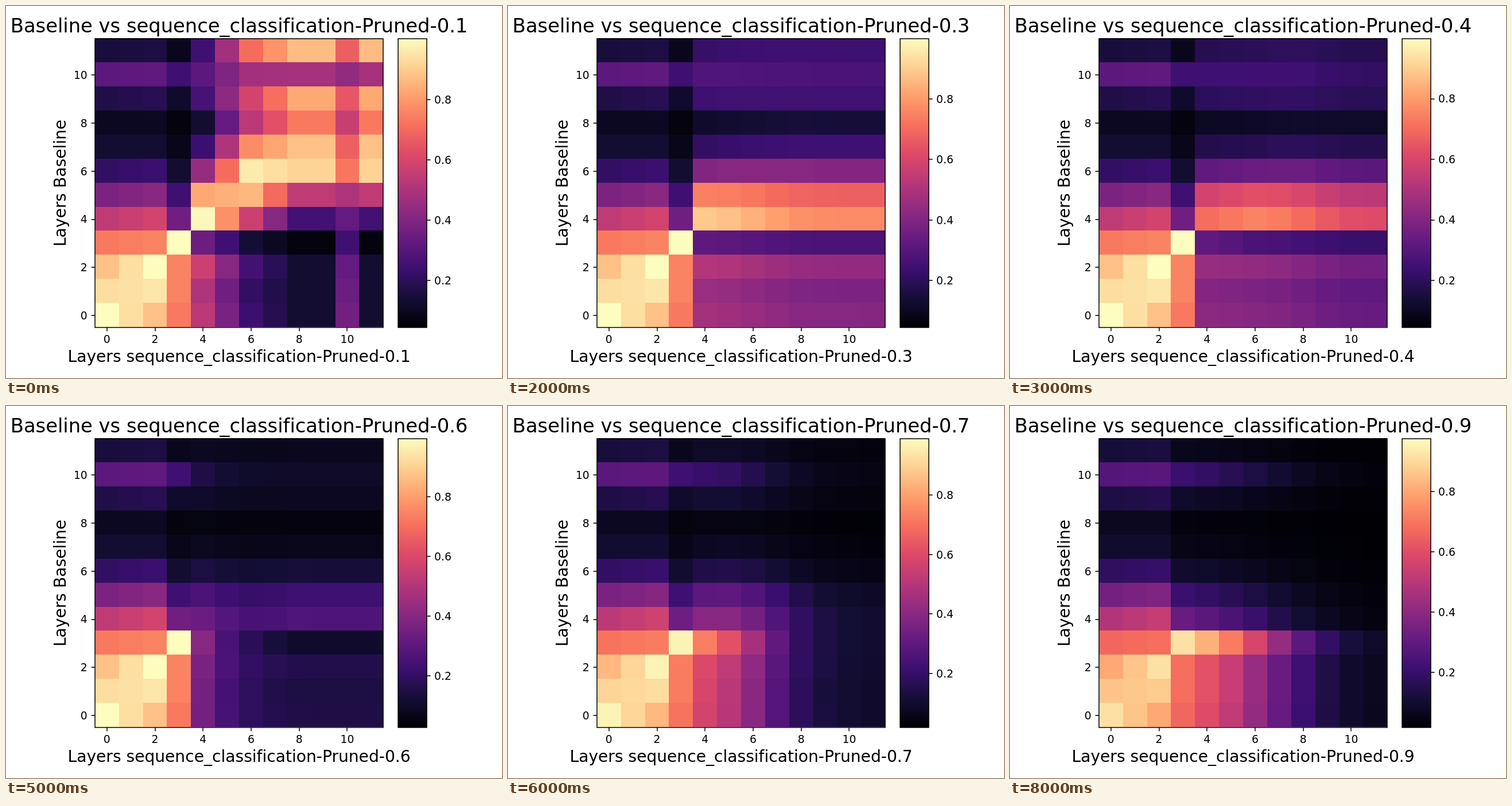
These frames come from a looping animation (864x648 px, 9000 ms). An HTML page:

```html
<!DOCTYPE html>
<html lang="en">
<head>
<meta charset="utf-8">
<title>Layer similarity</title>
<style>
html, body { margin: 0; width: 100%; height: 100%; overflow: hidden; background: #fff; }
svg { display: block; width: 864px; height: 648px; }
text { font-family: "DejaVu Sans", Verdana, sans-serif; font-size: 18.75px; font-variant-ligatures: none; }
.title { font-size: 33.75px; }
.label { font-size: 28.125px; }
.mid { text-anchor: middle; }
.end { text-anchor: end; }
.line { fill: none; stroke: #000; stroke-width: 1.5; }
.cell { shape-rendering: crispEdges; }
</style>
</head>
<body>
<svg id="stage" viewBox="0 0 864 648"></svg>
<script>
const LAYERS = 12, STEPS = 9, STEP_MS = 1000;
const LEFT = 154.85, TOP = 57, BOTTOM = 560, HEIGHT = BOTTOM - TOP, CELL = 41.87;
const GRID_BOTTOM = 558.9;
const BAR = 683, BAR_W = 50, TICK = 6.56, PAD = 13.1;

// Colour map in even steps from 0 to 100.
const MAGMA = [
  '#000004', '#140e36', '#3b0f70', '#641a80', '#8c2981', '#b73779',
  '#de4968', '#f7705c', '#fe9f6d', '#fecf92', '#fcfdbf'
].map(hex => [1, 3, 5].map(i => parseInt(hex.slice(i, i + 2), 16)));

const mix = (a, b, t) => a.map((v, i) => v + (b[i] - v) * t);

// Reads a list of values at x, blending between the nearest keys.
function blend(keys, x) {
  const known = Object.keys(keys).map(Number);
  const lo = Math.max(known[0], ...known.filter(k => k <= x));
  const hi = Math.min(known[known.length - 1], ...known.filter(k => k >= x));
  return hi > lo ? mix(keys[lo], keys[hi], (x - lo) / (hi - lo)) : keys[lo];
}

// Likeness of a few typical layers to each baseline layer, from 0 upwards.
const profiles = {
  0: [100, 93, 87, 72, 52, 36, 18, 9, 6, 13, 28, 11],
  2: [87, 95, 100, 74, 57, 39, 20, 9, 6, 15, 29, 12],
  3: [72, 74, 74, 100, 33, 21, 9, 4, 2, 8, 21, 5],
  4: [51, 48, 55, 32, 99, 82, 42, 20, 9, 23, 28, 21],
  6: [20, 18, 22, 10, 55, 85, 96, 76, 51, 57, 45, 69],
  8: [9, 9, 9, 2, 22, 52, 91, 87, 72, 82, 46, 86]
};

// Pruning makes upper layers resemble lower ones: they drift between the places
// [from, to] while their strength falls [near, far] around a column [mid, width].
const drift = { 1: [4, 8], 3: [4, 4.2], 5: [3.8, 4], 6: [3.4, 4], 8: [3, 3] };
const strength = {
  1: [1, 1, 6, 1], 3: [0.9, 0.8, 6.5, 0.8], 5: [0.6, 0.44, 10.5, 0.4],
  6: [0.81, 0.25, 4, 0.8], 8: [1, 0, 8.9, 1.2], 9: [1, 0.03, 6.4, 1.5]
};
const lowStrength = { 6: [1], 9: [0.94] };
const echo = { 1: [0.27], 3: [0] };  // layer 10 also resembles the first layers

// Heights of the 0.8 and 0.2 marks on the colour bar.
const scale = { 1: [163, 478], 5: [161, 478], 6: [158, 470], 8: [152, 462], 9: [149, 464] };

function column(step, col) {
  if (col < 4) return blend(profiles, col).map(v => v * blend(lowStrength, step)[0]);
  const [from, to] = blend(drift, step);
  const [near, far, mid, width] = blend(strength, step);
  const place = from + (to - from) * Math.min(1, (col - 4) / 4);
  const gain = far + (near - far) / (1 + Math.exp((col - mid) / width));
  const values = blend(profiles, place).map(v => v * gain);
  return col === 10 ? mix(values, profiles[0], blend(echo, step)[0]) : values;
}

function colour(value) {
  const x = Math.min(100, Math.max(0, value)) / 10;
  const i = Math.min(MAGMA.length - 2, Math.floor(x));
  return `rgb(${mix(MAGMA[i], MAGMA[i + 1], x - i).map(Math.round)})`;
}

function add(parent, tag, attrs, text = '') {
  const el = document.createElementNS('http://www.w3.org/2000/svg', tag);
  for (const name in attrs) el.setAttribute(name, attrs[name]);
  el.textContent = text;
  return parent.appendChild(el);
}

const stage = document.getElementById('stage');
const write = (x, y, cls, text) => add(stage, 'text', { x, y, class: cls }, text);
const line = d => add(stage, 'path', { d, class: 'line' });
const frame = (x, width) => add(stage, 'rect', { x, y: TOP, width, height: HEIGHT, class: 'line' });
const edgeX = n => Math.round(LEFT + n * CELL);
const edgeY = n => Math.round(GRID_BOTTOM - n * CELL);

const columns = Array.from({ length: LAYERS }, (_, col) =>
  Array.from({ length: LAYERS }, (_, row) => add(stage, 'rect', {
    class: 'cell', x: edgeX(col), y: edgeY(row + 1),
    width: edgeX(col + 1) - edgeX(col), height: edgeY(row) - edgeY(row + 1)
  })));

const ramp = add(stage, 'linearGradient', { id: 'ramp', x1: 0, y1: 1, x2: 0, y2: 0 });
MAGMA.forEach((c, i) => add(ramp, 'stop', { offset: i / (MAGMA.length - 1), 'stop-color': `rgb(${c})` }));
add(stage, 'rect', { x: BAR, y: TOP, width: BAR_W, height: HEIGHT, fill: 'url(#ramp)' });
frame(155, 502);
frame(BAR, BAR_W);

for (let n = 0; n < LAYERS; n += 2) {
  const x = LEFT + (n + 0.5) * CELL, y = BOTTOM - (n + 0.5) * CELL;
  line(`M${Math.round(x)} ${BOTTOM}v${TICK}`);
  line(`M155 ${Math.round(y)}h${-TICK}`);
  write(x, 587.4, 'mid', n);
  write(LEFT - PAD, y + 6.9, 'end', n);
}

const centre = LEFT + LAYERS * CELL / 2;
const title = write(centre, 46, 'title mid');
const xLabel = write(centre, 620.3, 'label mid');
write(0, 0, 'label mid', 'Layers Baseline')
  .setAttribute('transform', `translate(104 ${(TOP + BOTTOM) / 2}) rotate(-90)`);

const marks = [0.8, 0.6, 0.4, 0.2].map(v => ({
  tick: line(''),
  text: write(BAR + BAR_W + PAD, 0, '', v)
}));

function draw(step) {
  const name = `sequence_classification-Pruned-0.${step}`;
  title.textContent = `Baseline vs ${name}`;
  xLabel.textContent = `Layers ${name}`;
  columns.forEach((cells, col) => {
    const values = column(step, col);
    cells.forEach((cell, row) => cell.setAttribute('fill', colour(values[row])));
  });
  const [high, low] = blend(scale, step);
  marks.forEach(({ tick, text }, i) => {
    const y = high + (low - high) * i / 3;
    tick.setAttribute('d', `M${BAR + BAR_W} ${Math.round(y)}h${TICK}`);
    text.setAttribute('y', y + 6.9);
  });
}

const start = performance.now();
let shown = 0;
function tick() {
  const step = 1 + Math.floor((performance.now() - start) / STEP_MS) % STEPS;
  if (step !== shown) draw(shown = step);
  requestAnimationFrame(tick);
}
tick();
</script>
</body>
</html>
```
